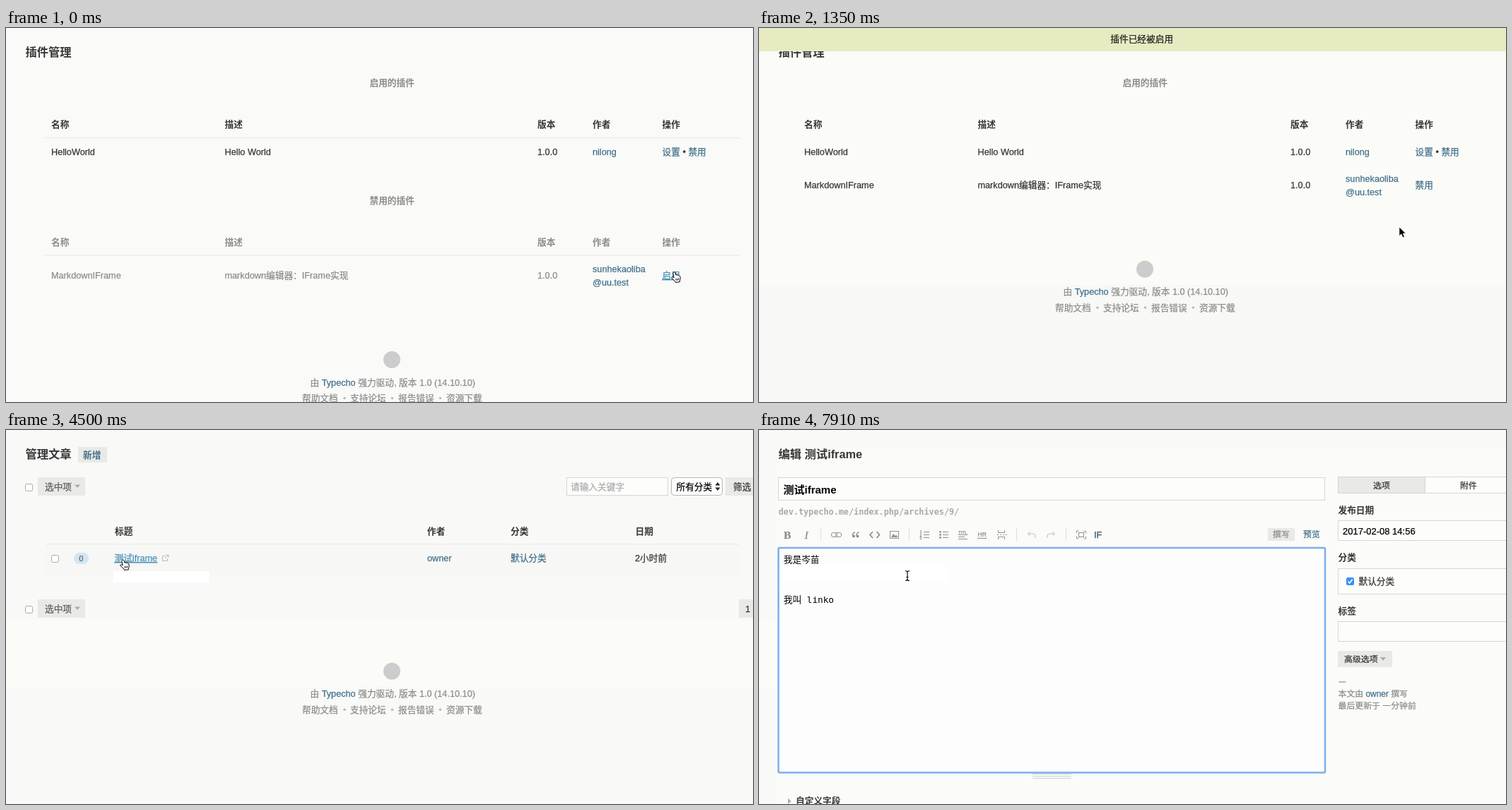
An HTML page for the animation above (8 s loop, 1057x530 px).

```html
<!DOCTYPE html>
<html lang="zh-CN">
<head>
<meta charset="utf-8">
<title>插件管理</title>
<style>
html, body { margin: 0; width: 100%; height: 100%; overflow: hidden; background: #fafaf8; }
svg { display: block; color: #363636; }
text { font: 12.7px "Liberation Sans", "Noto Sans CJK SC", "Noto Sans CJK", sans-serif; white-space: pre; stroke-width: .25; }
text, tspan { fill: currentColor; stroke: currentColor; }
.b, .h { font-weight: bold; stroke-width: 0; }
.h { font-size: 16.3px; }
.s { font-size: 11.9px; }
.mono { font-family: "DejaVu Sans Mono", "Noto Sans CJK SC", "Noto Sans CJK", monospace; stroke-width: 0; }
.dark { color: #000; }
.g { color: #8c8c8c; }
.pale { color: #aaa; }
.l { color: #41708b; }
.hover { color: #4590b8; text-decoration: underline; }
.btn { fill: #e9e9e6; }
.tri { fill: #aaa; }
.line { fill: #eeeeeb; }
.field { fill: #fdfdfc; stroke: #d6d6d3; }
.icon { fill: none; stroke: #909090; }
.ring { fill: none; stroke: #7fb0ec; stroke-width: 2.6; }

/* every change is a hard step on one shared 8 s clock */
.t { opacity: 0; animation: 8s step-end infinite; }
.list { animation-name: list; }
.enabled { animation-name: enabled; }
.posts { animation-name: posts; }
.editor { animation-name: editor; }
@keyframes list { 0% { opacity: 1 } 9.375% { opacity: 0 } }
@keyframes enabled { 9.375% { opacity: 1 } 43.125% { opacity: 0 } }
@keyframes posts { 43.125% { opacity: 1 } 63.75% { opacity: 0 } }
@keyframes editor { 63.75% { opacity: 1 } }

.early { animation-name: early; }
.late { animation-name: late; }
.rules { animation-name: rules; }
.head { animation-name: head; }
@keyframes early { 9.375% { opacity: 1 } 16.875% { opacity: 0 } }
@keyframes late { 16.875% { opacity: 1 } }
@keyframes rules { 0% { opacity: 1 } 16.875% { opacity: 0 } 20.625% { opacity: 1 } }
@keyframes head { 20.625% { opacity: 1 } }

.row { animation: row 8s step-end infinite; }
@keyframes row {
  0%, 9.375% { fill: #fffda2 } 11.25% { fill: #fefbb5 } 13.125% { fill: #fdfac9 }
  15% { fill: #fcfbe2 } 16.875% { fill: transparent }
}
.bar { fill: #e8ebc1; animation: bar 8s step-end infinite; }
@keyframes bar {
  0%, 9.375% { fill: #c6d880; transform: scaleY(.35) }
  11.25% { fill: #c8d680; transform: none } 13.125% { fill: #ccd486 }
  15% { fill: #dadfa4 } 16.875% { fill: #e8ebc1 }
}
.note { animation-name: note; }
@keyframes note { 11.25% { opacity: 1 } }

.plain { animation-name: plain; }
.over { animation-name: over; }
@keyframes plain { 0% { opacity: 1 } 54.375% { opacity: 0 } }
@keyframes over { 54.375% { opacity: 1 } }
.trail { animation: trail 8s step-end infinite; }
@keyframes trail {
  0% { transform: scaleX(0) } 48.75% { transform: scaleX(.3) } 50.625% { transform: scaleX(.62) }
  52.5% { transform: scaleX(.93) } 54.375% { transform: none }
}

.title-on { animation-name: title-on; }
.body-on { animation-name: body-on; }
.smear { animation-name: smear; }
@keyframes title-on { 0% { opacity: 1 } 93.25% { opacity: 0 } }
@keyframes body-on { 93.25% { opacity: 1 } }
@keyframes smear { 71.25% { opacity: 1 } 93.25% { opacity: 0 } }

.cursor { animation: move 8s step-end infinite; }
@keyframes move {
  0% { transform: translate(941px, 345px) }
  1.875%, 9.375%, 13.125% { transform: translate(940px, 347px) }
  15% { transform: translate(929px, 318px) }
  16.875% { transform: translate(905px, 281px) }
  18.75% { transform: translate(872px, 281px) }
  20.625% { transform: translate(832px, 281px) }
  22.5% { transform: translate(771px, 281px) }
  26.25% { transform: translate(728px, 262px) }
  28.125% { transform: translate(632px, 190px) }
  30% { transform: translate(531px, 113px) }
  46.875% { transform: translate(279px, 200px) }
  48.75% { transform: translate(237px, 200px) }
  50.625% { transform: translate(194px, 200px) }
  52.5% { transform: translate(154px, 199px) }
  54.375% { transform: translate(159px, 187px) }
  56.25%, 63.75% { transform: translate(161px, 183px) }
  65.625% { transform: translate(222px, 172px) }
  67.5% { transform: translate(303px, 163px) }
  69.375% { transform: translate(379px, 176px) }
  71.25% { transform: translate(456px, 156px) }
  73.125% { transform: translate(461px, 157px) }
  75% { transform: translate(466px, 160px) }
  76.75% { transform: translate(469px, 163px) }
  78.5% { transform: translate(436px, 171px) }
  80.375% { transform: translate(371px, 181px) }
  82.25% { transform: translate(283px, 191px) }
  84% { transform: translate(192px, 198px) }
  85.875% { transform: translate(130px, 201px) }
  87.625% { transform: translate(168px, 200px) }
  89.5% { transform: translate(228px, 199px) }
  93.25% { transform: translate(255px, 197px) }
  95.125% { transform: translate(238px, 198px) }
  97% { transform: translate(220px, 199px) }
  98.875% { transform: translate(206px, 199px) }
}
.hand { animation-name: hand; }
.arrow { animation-name: arrow; }
.beam { animation-name: beam; }
@keyframes hand {
  0% { opacity: 1 } 15% { opacity: 0 } 54.375% { opacity: 1 } 65.625% { opacity: 0 }
  71.25% { opacity: 1 } 78.5% { opacity: 0 }
}
@keyframes arrow {
  15% { opacity: 1 } 31.875% { opacity: 0 } 46.875% { opacity: 1 } 54.375% { opacity: 0 }
}
@keyframes beam { 65.625% { opacity: 1 } 71.25% { opacity: 0 } 78.5% { opacity: 1 } }
</style>
</head>
<body>
<svg width="1057" height="530" viewBox="0 0 1057 530">
<defs>
  <g id="foot">
    <circle cx="546" cy="470" r="12" fill="#ccc"/>
    <text class="g" x="430.5" y="506.5">由 <tspan class="l">Typecho</tspan> 强力驱动, 版本 1.0 (14.10.10)</text>
    <text class="g" x="419" y="529">帮助文档</text>
    <text class="g" x="487" y="529">支持论坛</text>
    <text class="g" x="555" y="529">报告错误</text>
    <text class="g" x="623" y="529">资源下载</text>
    <g fill="#bbb"><circle cx="479" cy="524.5" r="1.8"/><circle cx="546.5" cy="524.5" r="1.8"/><circle cx="614.5" cy="524.5" r="1.8"/></g>
  </g>
  <g id="cols">
    <text class="b" x="64" y="141">名称</text>
    <text class="b" x="309.5" y="141">描述</text>
    <text class="b" x="752" y="141">版本</text>
    <text class="b" x="830" y="141">作者</text>
    <text class="b" x="928.5" y="141">操作</text>
  </g>
  <g id="plugins">
    <text class="h" x="27.5" y="40.3">插件管理</text>
    <text class="b g" x="514.5" y="82">启用的插件</text>
    <use href="#cols"/>
    <text x="64" y="179.5">HelloWorld</text>
    <text x="309.5" y="179.5">Hello World</text>
    <text x="752" y="179.5">1.0.0</text>
    <text class="l" x="830" y="179.5">nilong</text>
    <text x="928.5" y="179.5"><tspan class="l">设置</tspan> • <tspan class="l">禁用</tspan></text>
  </g>
  <g id="mdrow">
    <text x="64" y="355">MarkdownIFrame</text>
    <text x="309.5" y="355">markdown编辑器：IFrame实现</text>
    <text x="752" y="355">1.0.0</text>
    <text class="l" x="830" y="346">sunhekaoliba</text>
    <text class="l" x="830" y="365">@uu.test</text>
  </g>
  <rect id="box" x=".5" y=".5" width="10" height="10" rx="2" fill="#fff" stroke="#aaa"/>
  <g id="pick">
    <use href="#box" x="27" y="76"/>
    <rect class="btn" x="45" y="67" width="67" height="26"/>
    <text x="55" y="84.5" color="#5c5c5c">选中项</text>
    <path class="tri" d="M97 77.5h8l-4 4.5z"/>
  </g>
</defs>

<rect width="1057" height="530" fill="#fafaf8"/>

<g class="t list">
  <use href="#plugins"/>
  <rect class="line" x="55" y="155" width="983" height="1.5"/>
  <text class="b g" x="514.5" y="248.7">禁用的插件</text>
  <use class="g" href="#cols" y="167"/>
  <rect class="line" x="55" y="321.5" width="983" height="1.5"/>
  <use class="g" href="#mdrow"/>
  <text class="hover" x="928.5" y="355">启用</text>
  <use href="#foot"/>
</g>

<g class="t enabled">
  <rect width="1057" height="530" fill="#f8f8f7"/>
  <rect class="t early" width="1057" height="252" fill="#fdfdfb"/>
  <rect class="t late" width="1057" height="364" fill="#fbfbf7"/>
  <g class="t head">
    <rect x="55" y="33" width="983" height="267" fill="#fcfcfb"/>
    <rect x="55" y="113" width="983" height="81" fill="#fefefe"/>
  </g>
  <rect class="row" x="55" y="194" width="983" height="58" fill="transparent"/>
  <g class="t rules">
    <rect class="line" x="55" y="155" width="983" height="1.5"/>
    <rect class="line" x="55" y="194" width="983" height="1"/>
  </g>
  <use href="#plugins"/>
  <use href="#mdrow" y="-128.3"/>
  <text class="l" x="928.5" y="226.7">禁用</text>
  <use href="#foot" y="-128.3"/>
  <rect class="bar" width="1057" height="33"/>
  <text class="t note" x="497.3" y="20.2" color="#222">插件已经被启用</text>
</g>

<g class="t posts">
  <rect width="1057" height="530" fill="#f9f9f7"/>
  <rect y="270" width="1057" height="94" fill="#fbfbf7"/>
  <rect x="55" y="162" width="983" height="46" fill="#f7f7f5"/>
  <rect x="55" y="277" width="983" height="23" fill="#fbfbf9"/>
  <text class="h" x="27.5" y="40.3">管理文章</text>
  <rect class="btn" x="102" y="24" width="41" height="22"/>
  <text class="b l" x="109" y="40">新增</text>
  <use href="#pick"/>
  <rect class="field" x="793.5" y="67.5" width="143" height="25"/>
  <text class="pale" x="799" y="84.5">请输入关键字</text>
  <rect x="941.5" y="67.5" width="72" height="25" rx="4" fill="#fff" stroke="#b5b5b5"/>
  <text class="dark" x="948.5" y="84.5">所有分类</text>
  <path d="M1003.5 78.5h7l-3.5-4.5zM1003.5 81.5h7l-3.5 4.5z" fill="#222"/>
  <rect class="btn" x="1018" y="67" width="39" height="26"/>
  <text x="1029" y="84.5">筛选</text>
  <text class="b" x="154" y="147.5">标题</text>
  <text class="b" x="596" y="147.5">作者</text>
  <text class="b" x="714" y="147.5">分类</text>
  <text class="b" x="890.5" y="147.5">日期</text>
  <rect class="line" x="55" y="161" width="983" height="1.5"/>
  <use href="#box" x="64" y="177"/>
  <rect x="96" y="174" width="21" height="16" rx="8" fill="#d6e5ee"/>
  <text class="l" x="103.3" y="186" style="font-size:11px">0</text>
  <text class="l t plain" x="153.5" y="186">测试iframe</text>
  <text class="hover t over" x="153.5" y="186">测试iframe</text>
  <path d="M226 178.5h-4.5v7h7v-3.5M225 182l5-5M226.5 177h3.5v3.5" fill="none" stroke="#bbb"/>
  <text class="l" x="596" y="186">owner</text>
  <text class="l" x="714" y="186">默认分类</text>
  <text x="890" y="186">2小时前</text>
  <g transform="translate(288 200)"><rect class="trail" x="-136" width="136" height="16" fill="#fff"/></g>
  <use href="#pick" y="173"/>
  <rect class="btn" x="1037" y="240" width="20" height="26"/>
  <text x="1046" y="257.5">1</text>
  <use href="#foot" y="-128.3"/>
</g>

<g class="t editor">
  <rect width="1057" height="530" fill="#f9f9f7"/>
  <rect y="270" width="25" height="94" fill="#fbfbf7"/>
  <rect x="25" y="25" width="1032" height="505" fill="#fbfbf9"/>
  <text class="h" x="27.5" y="40.3">编辑 测试iframe</text>
  <rect class="field" x="27.5" y="67.5" width="773" height="32"/>
  <g class="t title-on">
    <rect class="ring" x="27.5" y="67.5" width="773.5" height="32.5" rx="1.5"/>
    <rect x="34" y="75" width="76" height="18" fill="#b4d5fe"/>
  </g>
  <text class="b dark" x="34.5" y="89.5" style="font-size:15px">测试iframe</text>
  <text class="mono b pale" x="27.5" y="120" style="font-size:11.8px">dev.typecho.me/index.php/archives/9/</text>

  <rect x="27.5" y="167.5" width="773" height="318" fill="#fcfcfa"/>
  <path class="t smear" d="M300 161h84v5h17v-9h70v36h-94v-9h-60v-6h-17z" fill="#fff"/>
  <rect x="27.5" y="167.5" width="773" height="318" fill="none" stroke="#d6d6d3"/>
  <g class="t body-on">
    <rect class="ring" x="27.5" y="167" width="773.5" height="318.5" rx="1.5" style="fill:#fdfdfd"/>
    <rect x="35" y="191" width="232" height="25" fill="#fff"/>
  </g>
  <text class="mono dark" x="34.8" y="187.7">我是岑苗</text>
  <text class="mono dark" x="34.8" y="245">我叫 linko</text>

  <path d="M87.5 139v18M212.5 139v18M364.5 139v18M434.5 139v18" stroke="#ddd"/>
  <text class="g" x="35" y="153.5" style="font:bold 15.5px 'Liberation Serif',serif">B</text>
  <text class="g" x="64.5" y="153.5" style="font:italic 15.5px 'Liberation Serif',serif">I</text>
  <g class="icon">
    <rect x="102.5" y="145.5" width="8" height="6" rx="2.5"/><rect x="108.5" y="145.5" width="8" height="6" rx="2.5"/>
    <path d="M136 145q-4 1-3.5 5M141.5 145q-4 1-3.5 5" stroke-width="1.3"/>
    <path d="M161 144l-4 4.5 4 4.5M166.5 144l4 4.5-4 4.5" stroke-width="1.8"/>
    <rect x="185.5" y="143.5" width="12" height="10"/>
    <path d="M233 144.5h8M233 148.5h8M233 152.5h8M260 144.5h8M260 148.5h8M260 152.5h8"/>
    <path d="M282 148.5h13M282 151.5h9M282 154.5h13M309 153.5h13"/>
    <path d="M338.5 142v3.5h9V142M337 148.5h2m2 0h2m2 0h2m2 0h2M338.5 155v-3.5h9v3.5"/>
    <path d="M383.5 144l-3 3 3 3M381 147h7q3 0 3 3v3" stroke="#bbb"/>
    <path d="M415.5 144l3 3-3 3M418 147h-7q-3 0-3 3v3" stroke="#bbb"/>
    <rect x="452.5" y="145.5" width="7" height="6"/>
    <path d="M449.5 146v-3h3M459.5 143.5h3v3M462.5 151v3h-3M452.5 153.5h-3v-3"/>
  </g>
  <g fill="#909090">
    <circle cx="134" cy="150.5" r="2"/><circle cx="139.5" cy="150.5" r="2"/>
    <path d="M187 152l3-5 2.5 3 1.5-1.5 2.5 3.5z"/>
    <circle cx="256.5" cy="144.5" r="1.4"/><circle cx="256.5" cy="148.5" r="1.4"/><circle cx="256.5" cy="152.5" r="1.4"/>
  </g>
  <g class="g">
    <text x="227.5" y="146" style="font-size:5px">1</text>
    <text x="227.5" y="150.5" style="font-size:5px">2</text>
    <text x="227.5" y="155" style="font-size:5px">3</text>
    <text x="282" y="146.5" style="font-size:6px">TITL</text>
    <text x="309.5" y="151" style="font-size:8.5px">HR</text>
  </g>
  <text x="474" y="153" color="#2f566b">IF</text>
  <rect class="btn" x="720" y="139" width="38" height="18"/>
  <text class="s g" x="727" y="152.3">撰写</text>
  <text class="s l" x="770" y="152.3">预览</text>
  <path d="M387 487.5h55M387 490.5h55M387 493.5h55" stroke="#ccc"/>
  <path class="tri" d="M41 522l4.5 4-4.5 4z"/>
  <text class="b" x="52" y="529.7">自定义字段</text>

  <rect class="field" x="819.5" y="66.5" width="250" height="23"/>
  <rect class="btn" x="819.5" y="66.5" width="123" height="23" stroke="#d6d6d3"/>
  <text class="s" x="869" y="82.5">选项</text>
  <text class="s" x="992" y="82.5">附件</text>
  <text class="b" x="819.5" y="117.5">发布日期</text>
  <rect class="field" x="819.5" y="128.5" width="250" height="28"/>
  <text class="dark" x="826" y="147.5" style="font-size:13px">2017-02-08 14:56</text>
  <text class="b" x="819.5" y="185">分类</text>
  <rect class="field" x="819.5" y="196.5" width="250" height="36"/>
  <rect x="831" y="209" width="11" height="11" rx="2" fill="#3b90f5"/>
  <path d="M833.5 214.5l2.2 2.5 4-5.5" fill="none" stroke="#fff" stroke-width="1.5"/>
  <text x="848.5" y="218.7">默认分类</text>
  <text class="b" x="819.5" y="260.5">标签</text>
  <rect class="field" x="819.5" y="271.5" width="250" height="28"/>
  <rect class="btn" x="819" y="313" width="77" height="23"/>
  <text class="s" x="828" y="329.3">高级选项</text>
  <path class="tri" d="M879 322h8l-4 5z"/>
  <rect x="820.5" y="356.5" width="10" height="1" fill="#777"/>
  <text class="s g" x="819.5" y="378">本文由 <tspan class="l">owner</tspan> 撰写</text>
  <text class="s g" x="819.5" y="395.3">最后更新于 一分钟前</text>
</g>

<g class="cursor">
  <g class="t hand" fill="#fff" stroke="#000" stroke-linejoin="round">
    <path d="M3.2 1.6C3.6.6 5.2.5 5.700 1.800L7 5.200C7.600 4.600 8.600 4.700 8.900 5.400C9.500 4.800 10.500 5 10.800 5.800C11.500 5.400 12.400 5.800 12.600 6.600L13.200 9C13.500 11 12.700 12 12.400 13.200V14.800L6.600 15.500L6 14.200C4.400 13 3.300 11.200 1.200 9.800C.2 8.900.9 7.600 2.200 7.800L4.200 8.700L3 3.600C2.900 2.800 2.900 2.200 3.200 1.600z"/>
    <path d="M6.800 10l.5 2.800M8.800 9.800l.4 2.800M10.800 9.600l.2 2.800" stroke-width=".9"/>
  </g>
  <path class="t arrow" d="M.8.8v13.200l3-2.800 2.200 5 2.600-1.100-2.200-4.900h4.100z" fill="#000" stroke="#fff"/>
  <g class="t beam" fill="none">
    <path d="M1 .7q3 0 3 2v9.800q0 2-3 2M7 .7q-3 0-3 2v9.800q0 2 3 2M2.500 9.500h3" stroke="#fff" stroke-width="2.6"/>
    <path d="M1 .7q3 0 3 2v9.800q0 2-3 2M7 .7q-3 0-3 2v9.800q0 2 3 2M2.500 9.500h3" stroke="#111" stroke-width="1.2"/>
  </g>
</g>
</svg>
</body>
</html>
```
